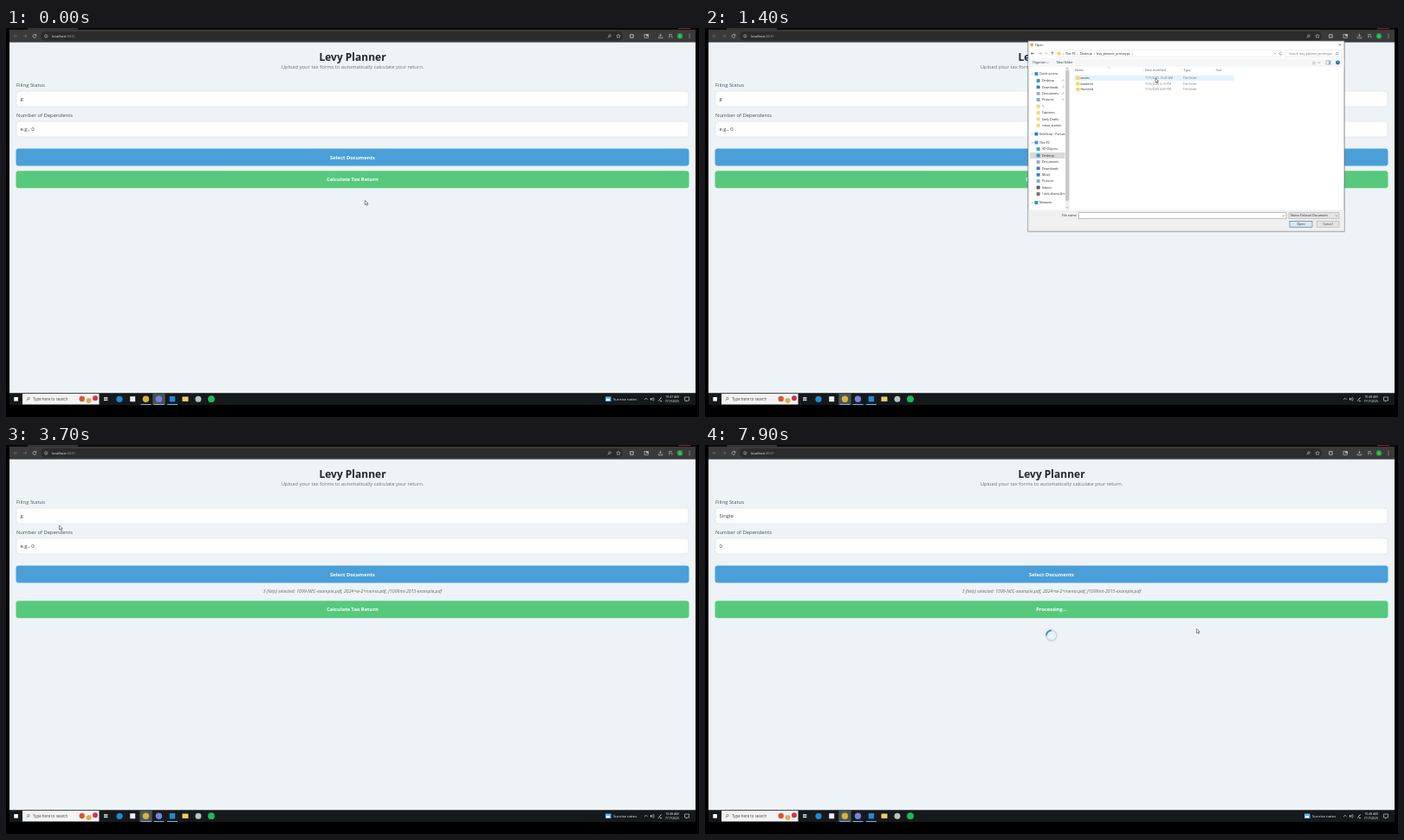
Recreate the animation shown at these times as an HTML page. Size 800 by 450 pixels, loop 8 s.

```html
<!DOCTYPE html>
<html lang="en">
<head>
<meta charset="utf-8">
<title>Levy Planner</title>
<style>
html, body { margin: 0; width: 100%; height: 100%; overflow: hidden; background: #000; }
svg { display: block; width: 100vw; height: 100vh; }
text { font-family: "Open Sans", "Noto Sans", sans-serif; white-space: pre; }
</style>
</head>
<body>
<svg id="stage" viewBox="0 0 800 450"></svg>
<script>
const LOOP = 8000, STEP = 100;
const stage = document.getElementById('stage');

// Drawing helpers; text is centred vertically on y.
const rect = (x, y, w, h, fill, extra = '') =>
  `<rect x="${x}" y="${y}" width="${w}" height="${h}" fill="${fill}" ${extra}/>`;
const dot = (x, y, r, fill, extra = '') =>
  `<circle cx="${x}" cy="${y}" r="${r}" fill="${fill}" ${extra}/>`;
const line = (d, color, w = 0.6, extra = '') =>
  `<path d="${d}" fill="none" stroke="${color}" stroke-width="${w}" ${extra}/>`;
const text = (x, y, s, size, fill, extra = '') =>
  `<text x="${x}" y="${y + size * 0.36}" font-size="${size}" fill="${fill}" ${extra}>${s}</text>`;
const group = (transform, body, extra = '') => `<g transform="${transform}" ${extra}>${body}</g>`;
const MID = 'text-anchor="middle"', END = 'text-anchor="end"';
const lens = (x, y, c) => dot(x, y, 1.3, 'none', `stroke="${c}" stroke-width=".5"`) +
  line(`M${x - 1} ${y + 1}l-1.3 1.3`, c);
const chevron = (x, y, c, dy = 1.1) => line(`M${x - 1.3} ${y - dy / 2}l1.3 ${dy}l1.3 ${-dy}`, c, 0.5);

function toolbar() {
  const c = '#d0d0d0', dim = '#777';
  return rect(4, 0, 792, 2, '#0b0b0b') + rect(25, 0, 58, 2, '#333') + rect(776, 0, 14, 1, '#9b1c2c') +
    rect(4, 2, 792, 14.5, '#3a3a3a') + rect(40, 4, 672, 10.5, '#2b2b2b', 'rx="5"') +
    line('M13 9.3h-4m1.8-1.8l-1.8 1.8l1.8 1.8', dim) + line('M20 9.3h4m-1.8-1.8l1.8 1.8l-1.8 1.8', dim) +
    line('M34.5 8.2a1.9 1.9 0 1 0 .3 1.6M34.9 6.9v1.6h-1.6', c) +
    dot(46.3, 9.3, 1.7, 'none', `stroke="${c}" stroke-width=".5"`) + line('M46.3 8.8v1.6', c, 0.5) +
    text(53, 9.2, 'localhost<tspan fill="#999">:8081</tspan>', 4, '#eee') + lens(697, 9, c) +
    line('M707 7l.7 1.5l1.6.2l-1.2 1.1l.3 1.6l-1.4-.8l-1.4.8l.3-1.6l-1.2-1.1l1.6-.2z', c, 0.5) +
    rect(720.7, 7.7, 3.4, 3.4, 'none', `stroke="${c}" stroke-width=".8"`) +
    rect(737, 7.4, 4.4, 3.8, 'none', `stroke="${c}" stroke-width=".6"`) + rect(739.2, 7.4, 2.2, 2, c) +
    line('M755.5 6.6v3m-1.4-1.3l1.4 1.4l1.4-1.4M753.3 10v1.7h4.4v-1.7', c) +
    line('M765 7.7h4M765 9.2h2.4M765 10.7h1.4M768.8 9v2.4', c) +
    dot(778, 9.3, 3.2, '#22a447') + text(778, 9.3, 'S', 3.4, '#fff', MID) +
    [7.3, 9.3, 11.3].map(y => dot(789, y, 0.55, c)).join('');
}

function field(y, label, value, focus, caret) {
  const ring = focus ? 'stroke="#20262c" stroke-width="1.2"' : 'stroke="#dbe2e7" stroke-width=".7"';
  return text(12, y - 7.5, label, 5.9, '#48525b') + rect(12, y, 776, 18, '#fdfefe', `rx="3" ${ring}`) +
    text(16.5, y + 9.2, value, 5.9, '#3a4248') +
    (caret >= 0 ? line(`M${caret} ${y + 6}v7`, '#111', 0.5) : '');
}

const button = (y, label, color) => rect(11.5, y, 777, 20, color, 'rx="3.2"') +
  text(400, y + 10.1, label, 5.8, '#fff', MID + ' font-weight="700"');

function page(t) {
  const picked = t >= 2600, busy = t >= 6300;
  const typed = 'Single'.slice(0, Math.max(0, Math.floor((t - 4100) / 100)));
  const status = t < 4100 ? 'g' : typed;
  const count = t < 5100 ? 'e.g., 0' : '0';
  const onStatus = t >= 3900 && t < 4900, onCount = t >= 4900 && t < 6200;
  let s = rect(4, 16.5, 792, 406, '#edf3f6') +
    text(400, 33.5, 'Levy Planner', 12, '#1d262e', MID + ' font-weight="700"') +
    text(400, 45.4, 'Upload your tax forms to automatically calculate your return.', 5.8, '#69737b', MID) +
    field(73, 'Filing Status', status, onStatus, onStatus && t >= 4100 ? 17 + typed.length * 2.8 : -1) +
    field(108, 'Number of Dependents', count, onCount, onCount ? (t < 5100 ? 16.8 : 20.2) : -1) +
    button(139.5, 'Select Documents', '#4a9fd9');
  if (picked) s += text(400, 169.2,
    '3 file(s) selected: 1099-NEC-example.pdf, 2024+w-2+memo.pdf, f1099int-2015-example.pdf',
    5.2, '#626b72', MID + ' font-style="italic"');
  s += button(picked ? 180.2 : 165.3, busy ? 'Processing...' : 'Calculate Tax Return', '#57c97c');
  if (busy) s += dot(400, 220.5, 6, 'none', 'stroke="#c9dce9" stroke-width="1.8"') +
    group(`rotate(${(t - 7900) * 0.36} 400 220.5)`, line('M394 220.5a6 6 0 0 1 6-6', '#3a8ddb', 1.8));
  return s;
}

function taskbar(t) {
  const w = '#e8e8e8', active = t < 100 ? 176.5 : 161.5;
  const news = t < 1000 || t >= 2600;
  let s = rect(4, 422.5, 792, 13.5, '#15191c') + rect(9.3, 427, 4.6, 4.6, '#fff') +
    rect(19, 423, 88.5, 12.5, '#f2f3f4') + lens(26, 428.6, '#444') +
    text(31, 429.2, 'Type here to search', 4.4, '#444') +
    dot(87.7, 429, 3.2, '#d9552f') + dot(95.5, 431, 3, '#e7a84d') + dot(103, 428.2, 3, '#cf3350') +
    rect(113, 427.2, 4.4, 1.5, w) + rect(113, 429.6, 4.4, 1.5, w) +
    rect(active - 7.2, 422.5, 14.4, 13.5, '#4b5256');
  s += dot(131, 429.3, 3.6, '#2189d0') + rect(143.2, 426.2, 6, 6, '#e9eef0') +
    dot(161.5, 429.2, 3.7, '#d8b33c') + dot(176.5, 429.2, 3.7, '#7782d8') +
    rect(188.8, 426, 6.4, 6.4, '#2689cf') + rect(203.5, 426.5, 7, 5.4, '#f0cf62') +
    dot(222, 429.2, 3.5, '#b9c2c6') + dot(237, 429.2, 3.9, '#1fb959');
  s += [161.5, 176.5, 192].map(x => rect(x - 6, 435, 12, 1, '#76b9ed')).join('');
  if (news) s += rect(692, 426.5, 6.5, 5.5, '#66b7e6') + rect(693, 429, 4, 2, '#f5f8fa') +
    text(701, 429.3, 'Sunrise notes', 4.3, '#f2f2f2');
  s += line('M737 430l1.8-1.8l1.8 1.8', w) + rect(744, 428.2, 1.3, 2.2, w) +
    line('M746.3 427.8q1 1.5 0 3M747.4 427q1.6 2.3 0 4.6', w, 0.5) +
    line('M753.3 431.5l3.2-4.2M755 431.6h2', w, 0.8) +
    text(769, 426.6, t < 1200 ? '10:47 AM' : '10:48 AM', 3.6, '#f2f2f2', MID) +
    text(769, 432, '7/17/2025', 3.5, '#f2f2f2', MID) +
    line('M783.5 427h5v4h-2l-1 1.2v-1.2h-2z', w);
  return s;
}

// Sidebar: [local y, label, icon colour, heading?]
const SIDE = [
  [38, 'Quick access', '#3a8fd8', 1], [46, 'Desktop', '#2f95da'], [53.3, 'Downloads', '#3180c4'],
  [60.8, 'Documents', '#9fb0bd'], [68, 'Pictures', '#7fb2cf'], [75.5, '1', '#f5d76e'],
  [83, 'Captures', '#f5d76e'], [90.3, 'Early Drafts', '#f5d76e'], [97.8, 'robot_tracker', '#f5d76e'],
  [107.7, 'VeloStow - Person', '#1d80ce', 1], [117.5, 'This PC', '#4597d0', 1], [125, '3D Objects', '#35aeca'],
  [132.5, 'Desktop', '#2f95da'], [140, 'Documents', '#9fb0bd'], [147.3, 'Downloads', '#3180c4'],
  [154.8, 'Music', '#3384d6'], [162, 'Pictures', '#7fb2cf'], [169.5, 'Videos', '#555d70'],
  [177, '\\ deb.shares(Lnx)', '#777'], [187, 'Network', '#3a8fd8', 1]
];
const NORVO = 'Norvo Folioset D...', DIR = 'File folder';

// Rows: [name, date, size]; no size means a folder, no date means a group heading.
const DOWNLOADS = [
  ['Yesterday (1)'], ['A Sample Engineer Job Post', '7/16/2025 12:06 PM', '118 KB'],
  ['Earlier this week (1)'], ['robot_tracker.purf', '7/14/2025 9:45 PM'],
  ['Last week (2)'], ['Person_Sample_Resume', '7/12/2025 8:43 PM', '142 KB'],
  ['Rover Planner 1.13.4', '7/11/2025 12:47 PM'],
  ['Earlier this month (1)'], ['gitz-vent-mane-rsk-vask-image', '7/4/2025 6:39 PM'],
  ['Last month (7)'], ['CSE130_Assignment_3', '6/23/2025 10:23 AM', '111 KB'],
  ['Intro note for Belvane', '6/22/2025 4:57 PM', '42 KB'],
  ['6c986063-7ad7-4346-b81a-9907b7340dd3', '6/21/2025 4:47 PM', '18 KB'],
  ['37c59d76-9e0f-4ab6-bbc8-1942f6d3d22f', '6/21/2025 4:47 PM', '39 KB'],
  ['138011a7-da51-425f-b8f2-dbee1d3ba65', '6/21/2025 4:46 PM', '43 KB'],
  ['Unofficial Transcript', '6/21/2025 12:08 PM', '257 KB'],
  ['assign3_base_code', '6/20/2025 3:16 AM'],
  ['Earlier this year (8)'], ['General Systems Trainee 1 (Exa...', '4/22/2025 4:33 PM', '134 KB'],
  ['Basalt', '4/12/2025 3:17 PM', '1,035 KB'], ['DMR-14-RT1-2021-AGB-00056', '4/1/2025 12:30 PM', '499 KB']
];
const PROTOTYPE = [
  ['assets', '7/17/2025 10:45 AM'], ['backend', '7/16/2025 6:19 PM'], ['frontend', '7/16/2025 6:50 PM']
];
const ASSETS = [
  ['1099-NEC-example', '7/16/2025 8:09 PM', '142 KB'], ['2024+w-2+memo', '7/16/2025 8:36 PM', '419 KB'],
  ['f1099int-2015-example', '7/16/2025 8:47 PM', '142 KB'],
  ['Generated_Form_1040_Single', '7/17/2025 10:25 AM', '2 KB']
];

function fileRows(rows, grouped, hover, chosen) {
  let y = grouped ? 42.6 : 42.8, s = '';
  rows.forEach(([name, date, size], i) => {
    if (!date) {
      if (i) y += 1.5;
      s += chevron(53, y, '#666') + text(56, y, name, 4, '#33508a');
      y += 8.1;
      return;
    }
    const fill = i < chosen ? '#cce8fb' : i === hover ? '#e3f2fd' : '';
    if (fill) s += rect(53, y - 3.2, 185, 6.4, fill);
    s += size ? rect(55.6, y - 2.1, 3.6, 4.2, '#dc5a52') + rect(56.2, y - 0.2, 2.4, 1, '#fff')
              : rect(55.3, y - 2, 4.2, 4, '#f4d468');
    s += text(60.5, y, name, 3.6, '#222') + text(135, y, date, 3.45, '#747474') +
      text(179, y, size ? NORVO : DIR, 3.45, '#747474') +
      (size ? text(236.5, y, size, 3.4, '#747474', END) : '');
    y += 6.6;
  });
  return s;
}

const clip = (id, x, y, w, h) => `<clipPath id="${id}">${rect(x, y, w, h, '#000')}</clipPath>`;
const control = (x, y, w, h, label, edge, fill = '#e4e4e4') =>
  rect(x, y, w, h, fill, `stroke="${edge}" stroke-width=".7"`) +
  text(x + w / 2, y + h / 2, label, 3.6, '#222', MID);

function dialog(t) {
  const atHome = t < 1200, inAssets = t >= 1600;
  const chosen = inAssets ? Math.max(0, Math.min(3, Math.floor((t - 1500) / 200))) : 0;
  const path = atHome ? ['Downloads'] : ['Desktop', 'levy_planner_prototype'];
  if (inAssets) path.push('assets');
  const rows = atHome ? DOWNLOADS : inAssets ? ASSETS : PROTOTYPE;
  const active = atHome ? 14 : 12, g = '#666', hot = t >= 2300;
  const names = ASSETS.slice(0, chosen).map(r => `"${r[0]}"`).join(' ');

  let s = rect(-1, 0, 367, 221.5, '#000', 'opacity=".12"') +
    rect(0, 0, 365, 220, '#fff', 'stroke="#777" stroke-width=".7"') +
    dot(4.2, 4.4, 1.9, '#d8b33c') + text(8, 4.4, 'Open', 3.7, '#222') +
    line('M358.7 3.2l2.4 2.4m0-2.4l-2.4 2.4', '#333', 0.5);

  s += line('M7 14.5h-3.6m1.5-1.5l-1.5 1.5l1.5 1.5', '#444') +
    line('M12 14.5h3.6m-1.5-1.5l1.5 1.5l-1.5 1.5', '#aaa') + chevron(21, 14.5, g) +
    line('M28 16.4v-3.8m-1.5 1.5l1.5-1.5l1.5 1.5', '#444') +
    rect(32, 10.4, 260, 8.2, 'none', 'stroke="#ddd" stroke-width=".5"') +
    rect(33.5, 12.5, 4.2, 4, '#f4d468') +
    text(40, 14.5, '›  This PC  ›  ' + path.join('  ›  ') + (inAssets ? '' : '  ›'), 3.6, '#222') +
    chevron(285, 14.5, g) + line('M292.6 13.8a1.5 1.5 0 1 0 .2 1.2', g, 0.5) +
    rect(297, 10.4, 65, 8.2, '#fff', 'stroke="#ddd" stroke-width=".5"') +
    text(301, 14.5, 'Search ' + path[path.length - 1], 3.5, '#777') + lens(357, 14.3, g);

  s += rect(0.4, 20.3, 364.2, 9.5, '#f5f6f7') + text(5, 25, 'Organize', 3.7, '#223a5c') +
    chevron(22.5, 25, g) + text(33, 25, 'New folder', 3.7, '#223a5c') +
    line('M328 24h4m-4 1.5h4m-4 1.5h4', '#888', 0.4) + chevron(336, 25, g) +
    rect(344, 23, 5, 4, '#fff', 'stroke="#777" stroke-width=".5"') + rect(347, 23, 2, 4, '#79b5e5') +
    dot(357.5, 25, 2.4, '#1d6bb8') + text(357.5, 25, '?', 3.4, '#fff', MID);

  let side = rect(2, SIDE[active][0] - 3.6, 41, 7.2, '#d9d9d9');
  SIDE.forEach(([y, label, color, head], i) => {
    const x = head ? 9.5 : 11.7;
    side += rect(x - 2, y - 1.9, 4, 3.8, color, 'rx=".6"') + text(head ? 13 : 16, y, label, 3.6, '#222');
    if (head) side += chevron(4.8, y, '#888');
    if (i > 0 && i < 5) side += line(`M39.2 ${y + 1}l2-2m-.9-.4l1.3 1.3`, '#888', 0.5);
  });
  s += clip('side', 0, 30, 42.5, 165) + `<g clip-path="url(#side)">${side}</g>` +
    rect(43, 30, 4.6, 165.5, '#f0f0f0') + rect(43.2, 34, 4.2, 151, '#c8c8c8') +
    chevron(45.3, 32, g, -1.1) + chevron(45.3, 192.5, g);

  s += chevron(93, 30.9, '#999', -1) + [[54, 'Name'], [135, 'Date modified'], [179.5, 'Type'], [217, 'Size']]
    .map(([x, label]) => text(x, 33.9, label, 3.6, '#4c5f78') + line(`M${x - 2} 31v6`, '#e6e6e6', 0.4)).join('');
  s += clip('list', 48, 30, 316, 165.5) +
    `<g clip-path="url(#list)">${fileRows(rows, atHome, inAssets ? -1 : 0, chosen)}</g>`;
  if (atHome) s += rect(360, 30, 4.6, 165, '#f0f0f0') + rect(360.2, 34, 4.2, 58, '#c8c8c8');

  s += rect(0.4, 195.5, 364.2, 24.2, '#f0f0f0') + text(56.5, 202, 'File name:', 3.6, '#222', END) +
    rect(58.5, 198.7, 239.5, 7, '#fff', `stroke="${atHome ? '#3d8bd0' : '#999'}" stroke-width=".6"`) +
    text(60, 202.2, names, 3.6, '#222') + chevron(295, 202.2, g) +
    rect(301, 198.7, 58, 7, hot ? '#dcedf9' : '#e4e4e4', `stroke="${hot ? '#4a9bd8' : '#aaa'}" stroke-width=".6"`) +
    text(303, 202.2, 'Norvo Folioset Document', 3.6, '#222') + chevron(356, 202.2, g) +
    control(302, 208.5, 26, 6.8, 'Open', '#2a83cc', hot ? '#d5eafa' : undefined) +
    control(333, 208.5, 26, 6.8, 'Cancel', '#b5b5b5');
  return s;
}

function dialogLayer(t) {
  if (t < 500 || t >= 2600) return '';
  const fade = t < 600 ? 0.15 : t < 700 ? 0.55 : t < 2500 ? 1 : 0.45;
  const scale = t < 600 ? 0.95 : t < 700 || t >= 2500 ? 0.98 : 1;
  const k = ease((t - 800) / 300);
  const x = 6.5 + 366.5 * k, y = -10 + 25 * k;
  return group(`translate(${x + 182.5} ${y + 110}) scale(${scale}) translate(-182.5 -110)`,
    dialog(t), `opacity="${fade}"`);
}

// Pointer path: [time, x, y]
const PATH = [
  [0, 414.5, 199.5], [200, 410, 150], [600, 410, 150], [800, 190, 1], [1100, 556, 19],
  [1400, 520, 58], [1600, 520, 58], [1700, 458, 57], [2100, 462, 70], [2400, 685.5, 227],
  [2700, 685.5, 227], [3700, 61.5, 93], [3900, 52, 81.5], [5500, 52, 81.5], [6100, 470, 191],
  [6400, 470, 191], [6900, 567.5, 212.5], [LOOP, 567.5, 212.5]
];
function ease(k) {
  k = Math.max(0, Math.min(1, k));
  return k * k * (3 - 2 * k);
}
function pointer(t) {
  const i = PATH.findIndex(p => p[0] > t), a = PATH[i - 1], b = PATH[i];
  const k = ease((t - a[0]) / (b[0] - a[0]));
  const x = a[1] + (b[1] - a[1]) * k, y = a[2] + (b[2] - a[2]) * k;
  const ink = 'stroke="#222" stroke-width=".5"';
  let shape = `<path d="M0 0v5l1.2-1l.8 1.8l.9-.4l-.8-1.8h1.6z" fill="#fff" ${ink}/>`;
  if (t >= 3900 && t < 5600) shape = line('M-.8-2.4h1.6M0-2.4v4.8M-.8 2.4h1.6', '#555', 0.5);
  else if ((t >= 200 && t < 700) || (t >= 6000 && t < 6400))
    shape = `<path d="M0 0q.7-.5.9 0v2l2.2.6q.4 1.6-.5 3h-2.3l-1.8-2.4l1.5.3z" fill="#fff" ${ink}/>`;
  return group(`translate(${x} ${y})`, shape);
}

function render(t) {
  stage.innerHTML = rect(0, 0, 800, 450, '#000') + toolbar() + page(t) +
    dialogLayer(t) + taskbar(t) + pointer(t);
}

const start = performance.now();
let shown = -1;
function tick() {
  const t = Math.floor((performance.now() - start) % LOOP / STEP) * STEP;
  if (t !== shown) render(shown = t);
  requestAnimationFrame(tick);
}
tick();
</script>
</body>
</html>
```
